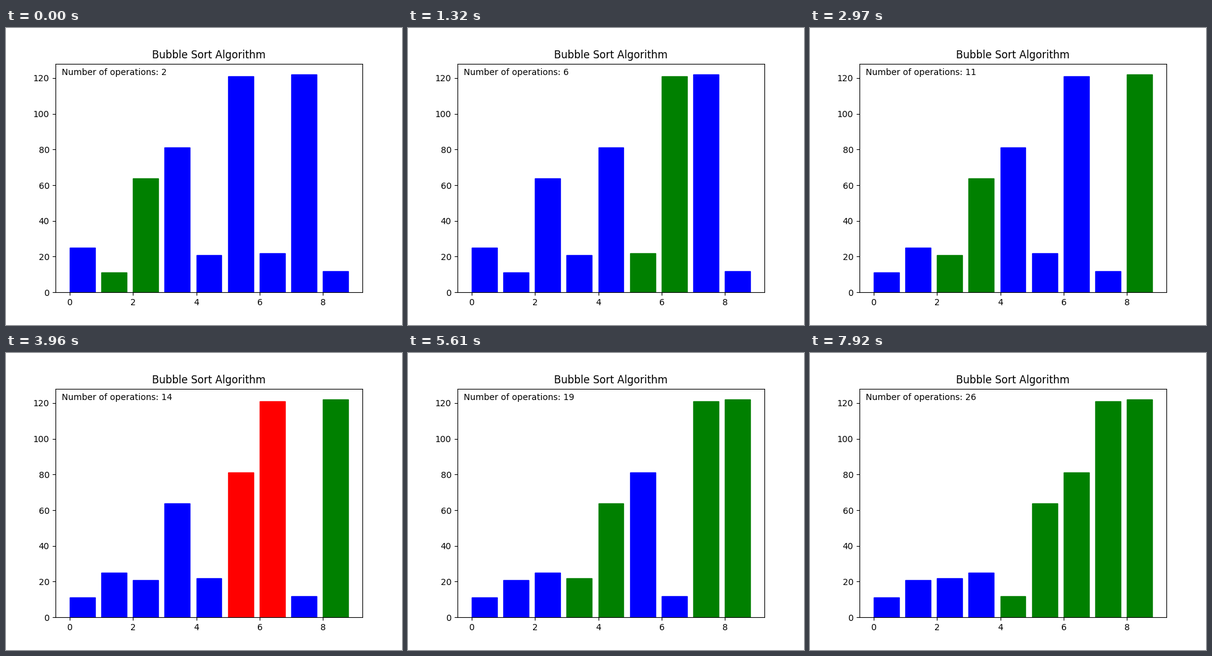
Animation, 640 px wide and 480 px high, one loop 8000 ms. Source, as a matplotlib script:

```python
import matplotlib.pyplot as plt
from matplotlib.animation import FuncAnimation

START = [25, 64, 11, 81, 21, 121, 22, 122, 12]
FIRST_OP = 2      # the loop opens on the second comparison
STEP_MS = 330
TICK_MS = 20
LOOP_MS = 8000


def bubble_steps(values):
    """Yield (values, colors) after every comparison."""
    a = list(values)
    for end in range(len(a) - 1, 0, -1):
        for j in range(end):
            swap = a[j] > a[j + 1]
            if swap:
                a[j], a[j + 1] = a[j + 1], a[j]
            colors = ["blue" if i <= end else "green" for i in range(len(a))]
            colors[j] = colors[j + 1] = "green" if swap else "red"
            yield list(a), colors


steps = list(bubble_steps(START))

plt.rcParams["font.family"] = "DejaVu Sans"
fig, ax = plt.subplots(figsize=(6.4, 4.8), dpi=100)
ax.set_title("Bubble Sort Algorithm")
bars = ax.bar(range(len(START)), START, align="edge")
ax.set_xlim(-0.44, 9.24)
ax.set_ylim(0, max(START) * 1.05)
label = ax.text(0.02, 0.95, "", transform=ax.transAxes)


def update(frame):
    # sample mid-tick so each change lands on the nearest tick
    op = FIRST_OP + (frame * TICK_MS + TICK_MS // 2) // STEP_MS
    values, colors = steps[op - 1]
    for bar, value, color in zip(bars, values, colors):
        bar.set_height(value)
        bar.set_color(color)
    label.set_text(f"Number of operations: {op}")
    return [*bars, label]


anim = FuncAnimation(fig, update, frames=LOOP_MS // TICK_MS, interval=TICK_MS,
                     init_func=lambda: update(0), repeat=True, repeat_delay=0)
plt.show()
```
